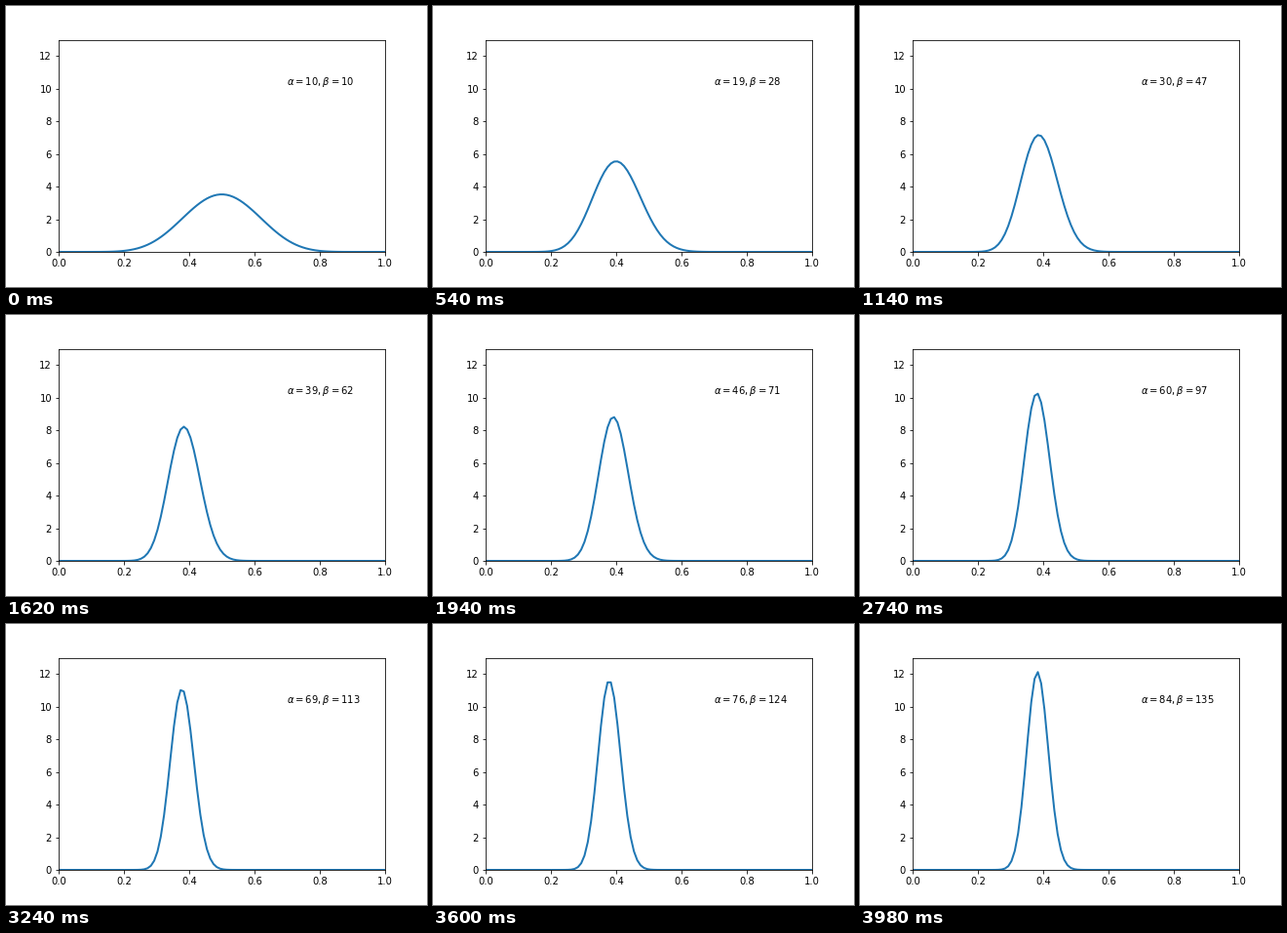
A matplotlib script for the animation above (4 s loop, 432 px wide and 288 px high).

```python
import math

import matplotlib.pyplot as plt
import numpy as np
from matplotlib.animation import FuncAnimation

FRAMES = 200
INTERVAL = 20
PRIOR = 10

plt.rcParams.update({"font.family": "DejaVu Sans", "font.size": 10})

x = np.linspace(0, 1, 100)

# One trial per step: running success count through a few known steps.
steps = [0, 27, 57, 81, 113, 162, 199]
successes = [0, 9, 20, 29, 42, 59, 74]
wins = np.rint(np.interp(np.arange(FRAMES), steps, successes)).astype(int)


def beta_pdf(a, b):
    log_norm = math.lgamma(a + b) - math.lgamma(a) - math.lgamma(b)
    return math.exp(log_norm) * x ** (a - 1) * (1 - x) ** (b - 1)


fig, ax = plt.subplots(figsize=(6, 4), dpi=72)
fig.subplots_adjust(left=0.125, right=0.9, bottom=0.125, top=0.88)
ax.set_xlim(0, 1)
ax.set_ylim(0, 13)
line, = ax.plot([], [], color="#1f77b4", lw=2)
label = ax.text(0.7, 0.8, "", transform=ax.transAxes, va="center")


def update(i):
    a = PRIOR + int(wins[i])
    b = PRIOR + i - int(wins[i])
    line.set_data(x, beta_pdf(a, b))
    label.set_text(rf"$\alpha={a}, \beta={b}$")
    return line, label


anim = FuncAnimation(fig, update, frames=FRAMES, interval=INTERVAL,
                     repeat=True, repeat_delay=0, blit=False)
plt.show()
```
